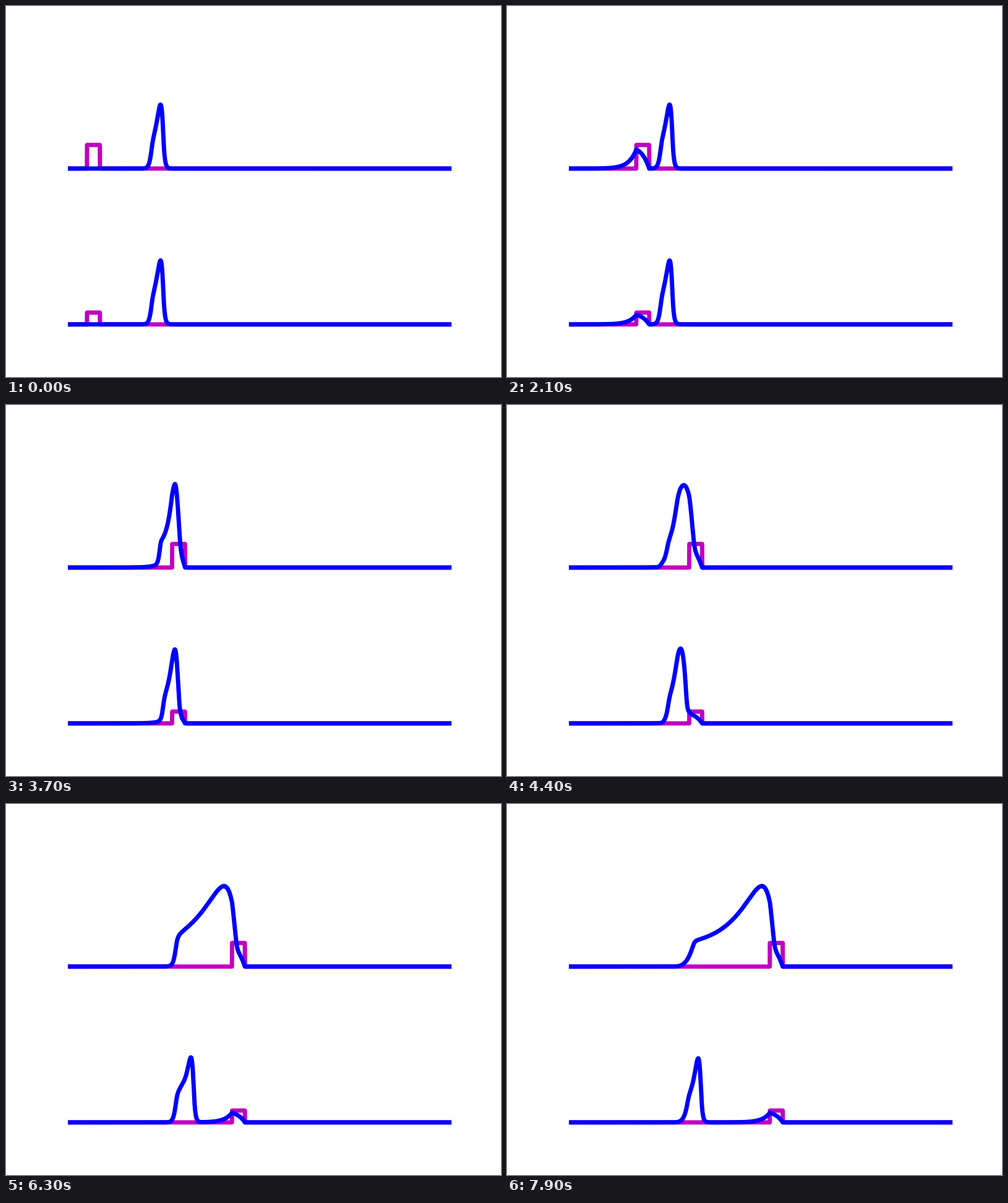
Write a matplotlib script that moves like this. It is 800 by 600 pixels and loops after 8000 ms.

```python
import matplotlib.pyplot as plt
import numpy as np
from matplotlib.animation import FuncAnimation

# Neural field with synaptic depression, driven by a moving square input:
#   u' = -u + w * (q H(u - theta)) + I(x, t)
#   alpha q' = 1 - q - alpha beta q H(u - theta)
FRAMES, INTERVAL = 80, 100
FRAME_DT, SUBSTEPS = 0.3, 20
DT = FRAME_DT / SUBSTEPS
ALPHA, BETA, THETA = 20.0, 0.25, 0.2
LENGTH, DX = 300.0, 0.1
INPUT_START, INPUT_WIDTH, INPUT_SPEED = 15.0, 10.0, 6.0
PULSE_FRONT = 75.0

x = np.linspace(0, LENGTH, int(LENGTH / DX) + 1)
taps = np.exp(-np.abs(np.arange(-120, 121) * DX))
taps /= taps.sum()
DECAY_U = np.exp(-DT)
DECAY_REST = np.exp(-DT / ALPHA)
DECAY_ACTIVE = np.exp(-DT * (1 / ALPHA + BETA))
Q_ACTIVE = 1 / (1 + ALPHA * BETA)


def stimulus(t, height):
    left = INPUT_START + INPUT_SPEED * t
    inside = (x >= left - 1e-6) & (x <= left + INPUT_WIDTH + 1e-6)
    return np.where(inside, height, 0.0)


def step(u, q, drive):
    active = u > THETA
    total = np.convolve(np.where(active, q, 0.0), taps, mode="same") + drive
    u = total + (u - total) * DECAY_U
    rest = np.where(active, Q_ACTIVE, 1.0)
    q = rest + (q - rest) * np.where(active, DECAY_ACTIVE, DECAY_REST)
    return u, q


def settled_pulse():
    """Let a rightward pulse form and run up to its starting place."""
    u = np.where((x > 20) & (x < 28), 0.5, 0.0)
    q = np.where(x < 20, Q_ACTIVE, 1.0)
    front = np.searchsorted(x, PULSE_FRONT - DX / 2)
    for _ in range(int(100 / DT)):
        if u[front] > THETA:
            break
        u, q = step(u, q, 0.0)
    return u, q


def simulate(u, q, height):
    history = [u]
    for n in range(1, FRAMES):
        for k in range(SUBSTEPS):
            t = (n - 1) * FRAME_DT + (k + 0.5) * DT
            u, q = step(u, q, stimulus(t, height))
        history.append(u)
    return history


heights = (0.2, 0.1)
pulse = settled_pulse()
runs = [simulate(*pulse, h) for h in heights]

fig, axes = plt.subplots(2, 1, figsize=(8, 6), dpi=100, facecolor="white")
fig.subplots_adjust(left=0.125, right=0.9, bottom=0.11, top=0.88, hspace=0.2)
lines = []
for ax in axes:
    ax.set_xlim(0, LENGTH)
    ax.set_ylim(-0.1, 1)
    ax.axis("off")
    drive_line, = ax.plot(x, 0 * x, color=(0.75, 0, 0.75), lw=5)
    field_line, = ax.plot(x, 0 * x, color=(0, 0, 1), lw=5)
    lines.append((drive_line, field_line))


def draw(n):
    for (drive_line, field_line), run, h in zip(lines, runs, heights):
        drive_line.set_ydata(stimulus(n * FRAME_DT, h))
        field_line.set_ydata(run[n])
    return [line for pair in lines for line in pair]


anim = FuncAnimation(fig, draw, frames=FRAMES, interval=INTERVAL,
                     repeat=True, repeat_delay=0, init_func=lambda: draw(0))
plt.show()
```
